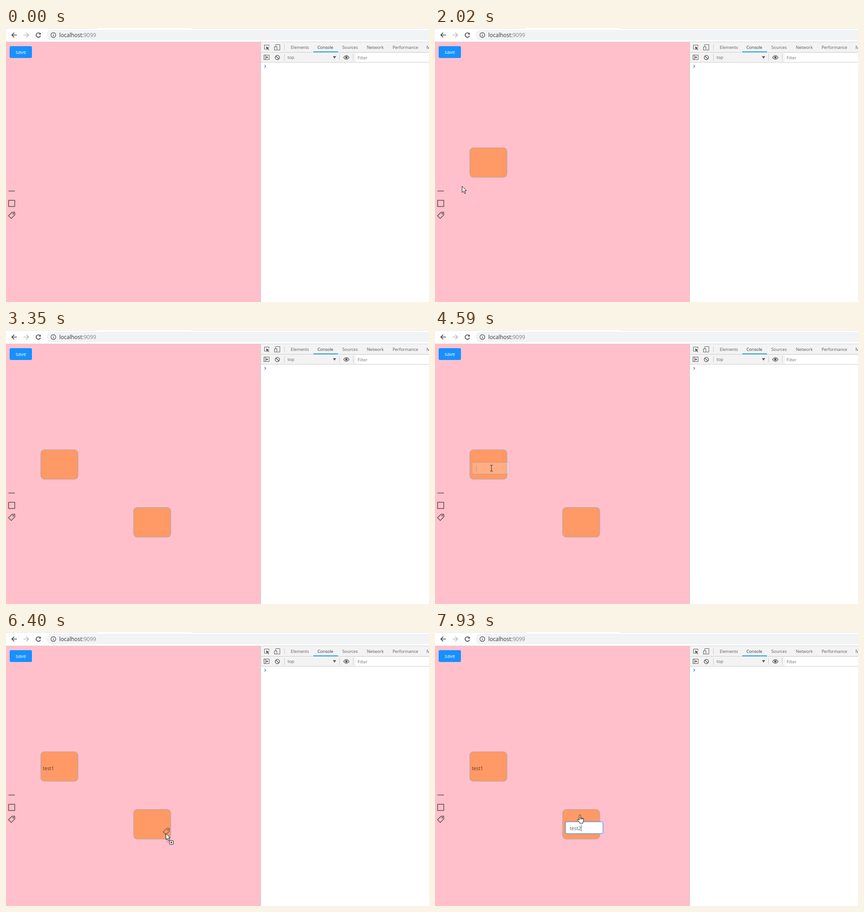
An HTML page that plays this animation: 929 by 603 pixels, repeating every 8000 ms.

```html
<!DOCTYPE html>
<html lang="en">
<head>
<meta charset="utf-8">
<title>Flow editor</title>
<style>
  html, body { margin: 0; width: 100%; height: 100%; overflow: hidden; background: #fff; }
  svg { display: block; width: 100%; height: 100%; font-family: "Open Sans", "Noto Sans", sans-serif; }
  .line { fill: none; stroke: #5a5a5a; }
  .tool { fill: none; stroke: #595050; stroke-width: 1.5; }
  .node { fill: #ff9966; stroke: #b5a6a0; stroke-width: 1.2; }
  .tabs { font-size: 9.3px; fill: #5a5a5a; }
  .label { font-size: 10.6px; fill: #000; fill-opacity: .65; }
  .field rect { fill: #fff; stroke: #40a9ff; }
  .field .glow { fill: none; stroke: #1890ff; stroke-opacity: .2; stroke-width: 2; }
  .field .caret { stroke: #555; stroke-width: 1; }
  .ghost { opacity: .75; }
  .cursor { fill: #fff; stroke: #111; stroke-width: 1; stroke-linejoin: round; }
</style>
</head>
<body>
<svg viewBox="0 0 929 603">
  <defs>
    <rect id="box" class="tool" x="5.7" y="379.2" width="13.6" height="13.6"/>
    <g id="tag" class="tool" stroke-linejoin="round">
      <path d="M13.2 405.6 19 405.2 19.6 411 11.6 419.2 5.4 413.2Z"/>
      <circle cx="16" cy="408.8" r="1.1" stroke-width="1.2"/>
    </g>
    <path id="pointer" d="M.5.5V14.2L3.6 11.3 5.9 16.6 8.2 15.6 6 10.4H10.2Z"/>
    <g id="arrow" class="cursor"><use href="#pointer"/></g>
    <g id="drag" class="cursor">
      <rect x="2.5" y="13.5" width="9" height="6" fill="none" stroke="#666" stroke-dasharray="1 1"/>
      <use href="#pointer"/>
      <rect x="8.5" y="16.5" width="8.5" height="8" rx=".8"/>
      <path d="M10.7 20.5H14.8M12.75 18.5V22.5" stroke-width="1.2"/>
    </g>
    <g id="hand" class="cursor">
      <path d="M-2 11.5V1.7a1.4 1.4 0 0 1 2.8 0V7L6 8.2q1.2.4 1.2 1.8V13q0 2-1.4 4V19H-1.2V17.4L-5.6 12.4q-1.2-1.8.3-2.2 1.3-.2 3.3 1.9"/>
      <path d="M.8 7V10.5M3 7.6V10.5M5.2 8.2V10.5" fill="none"/>
    </g>
    <path id="beam" d="M-3-6.5H-1Q0-6.5 0-5.5 0-6.5 1-6.5H3M0-5.5V5.5M-3 6.5H-1Q0 6.5 0 5.5 0 6.5 1 6.5H3" fill="none" stroke="#333" stroke-width="1.1"/>
  </defs>

  <!-- browser bar -->
  <rect width="929" height="31" fill="#fff"/>
  <path d="M0 .5H200M407 .5H929" stroke="#dee1e6"/>
  <rect x="89" y="4" width="900" height="23" rx="11.5" fill="#f1f3f4"/>
  <path d="M0 30.5H929" stroke="#d5d5d5"/>
  <g fill="none" stroke="#45484c" stroke-width="1.7">
    <path d="M24 15.5H13M18 10.3 12.8 15.5 18 20.7"/>
    <path d="M38.5 15.5H49.5M44.5 10.3 49.7 15.5 44.5 20.7" stroke="#b9bbbe"/>
    <path d="M74.6 12.2A4.9 4.9 0 1 0 75.8 17"/>
    <path d="M76.5 10V14.6H72Z" fill="#45484c" stroke="none"/>
    <circle cx="104" cy="15.5" r="5.3" stroke-width="1.2"/>
    <path d="M104 14.8V18.6M104 12.2V13.6" stroke-width="1.3"/>
  </g>
  <text x="117" y="19.7" font-size="12" fill="#2f3236">localhost:<tspan fill="#80868b">9099</tspan></text>

  <!-- page -->
  <rect y="31" width="559" height="572" fill="#ffc0cb"/>
  <rect x="8" y="40" width="49" height="26" rx="3" fill="#1890ff"/>
  <text x="32.7" y="56.8" font-size="11" fill="#fff" text-anchor="middle">save</text>
  <path class="tool" d="M5.5 358.7H19.5"/>
  <use href="#box"/>
  <use href="#tag"/>

  <!-- developer tools -->
  <rect x="559" y="31" width="370" height="45" fill="#f3f3f3"/>
  <rect x="559" y="76" width="370" height="527" fill="#fff"/>
  <rect x="768" y="55" width="161" height="20" fill="#fff"/>
  <path d="M559.5 31V603M559 53.5H929M559 75.5H929M611.5 36V49M611.5 57V72M732.5 57V72M762.5 57V72" stroke="#ccc" fill="none"/>
  <rect x="675" y="51.5" width="54" height="2" fill="#1a9fe8"/>
  <g class="line">
    <path d="M571.5 46.5H567.5V37.5H577.5V41"/>
    <path d="M571 40.5 578.5 44 575.3 45 578 48 577 49 574.2 46 572.8 48.8Z" fill="#5a5a5a" stroke="none"/>
    <path d="M592.5 41V36.5H601.5V48.5H596"/>
    <rect x="589.5" y="41.5" width="5.5" height="7"/>
    <rect x="566.5" y="59.5" width="11.5" height="10"/>
    <path d="M569.5 59.5V69.5"/>
    <path d="M571.5 61.8V67.4L576 64.6Z" fill="#5a5a5a" stroke="none"/>
    <g stroke-width="1.5"><circle cx="596" cy="65" r="4.7"/><path d="M592.7 61.7 599.3 68.3"/></g>
    <path d="M718 62H725L721.5 67.5Z" fill="#5a5a5a" stroke="none"/>
    <path d="M741.5 64.8Q747.5 56.5 753.5 64.8 747.5 73 741.5 64.8Z" stroke-width="1.3"/>
    <circle cx="747.5" cy="64.8" r="2.2" fill="#5a5a5a"/>
    <path d="M567.7 81.5 570.7 84.3 567.7 87.1" stroke="#2f8fee" stroke-width="1.4"/>
  </g>
  <g class="tabs">
    <text x="625.5" y="46.3">Elements</text>
    <text x="684" y="46.3" fill="#333">Console</text>
    <text x="738.5" y="46.3">Sources</text>
    <text x="792.5" y="46.3">Network</text>
    <text x="849" y="46.3">Performance</text>
    <text x="923.5" y="46.3">Memory</text>
    <text x="618.5" y="68.3">top</text>
    <text x="772" y="69.3" fill="#757575">Filter</text>
  </g>

  <!-- animated parts -->
  <rect id="node1" class="node" x="76.5" y="263.5" width="81.5" height="65" rx="8"/>
  <rect id="node2" class="node" x="280.3" y="390.7" width="81.5" height="65" rx="8"/>
  <text id="label1" class="label" x="81" y="303.7">test1</text>
  <g id="fields"></g>
  <use id="ghost" class="ghost"/>
  <use id="cursor"/>
</svg>

<script>
const LOOP = 8000;
const $ = id => document.getElementById(id);
const show = (el, on) => el.setAttribute('visibility', on ? 'visible' : 'hidden');

// Bursts of movement: start, end, number of screen updates
const bursts = [
  [150, 940, 11], [1000, 1090, 2], [1400, 2190, 11], [2250, 3040, 11],
  [3120, 3660, 8], [3890, 4270, 6], [4590, 4970, 6], [5220, 5990, 11],
  [6070, 6780, 10], [6940, 7640, 10], [7870, 7930, 2]
];

// Pointer path: time, x, y, kind ("box" and "tag" carry a dragged icon)
const path = [
  [150, 825, 577, 'arrow'], [310, 560, 240, 'arrow'], [470, 330, 73, 'arrow'],
  [700, 90, 250, 'arrow'], [930, 21, 369, 'hand'], [1090, 20, 384, 'hand'],
  [1399, 20, 382, 'box'], [1400, 50, 367, 'box'], [1630, 117, 296, 'box'],
  [1700, 117, 296, 'hand'], [1780, 112, 305, 'arrow'], [2100, 14, 384, 'hand'], [2190, 12, 386, 'hand'],
  [2249, 11, 387, 'box'], [2260, 22, 389, 'box'], [2720, 321, 419, 'box'], [2800, 321, 423, 'box'],
  [2880, 321, 423, 'hand'], [3040, 318, 420, 'hand'], [3120, 262, 395, 'arrow'],
  [3195, 110, 352, 'arrow'], [3270, -40, 360, 'arrow'], [3360, -30, 385, 'arrow'],
  [3425, 9, 404, 'hand'], [3660, 12, 413, 'hand'],
  [3889, 11, 415, 'tag'], [3890, 24, 404, 'tag'], [4265, 122, 304, 'tag'],
  [4590, 124, 304, 'beam'], [5530, 130, 304, 'beam'],
  [5610, 136, 318, 'hand'], [5680, 124, 330, 'arrow'], [5900, 20, 402, 'hand'], [6070, 12, 414, 'hand'],
  [6140, 11, 416, 'tag'], [6380, 351, 443, 'tag'], [6770, 327, 431, 'tag'],
  [6940, 329, 431, 'beam'], [7640, 337, 434, 'beam'],
  [7870, 322, 408, 'hand'], [7930, 319, 402, 'hand']
];

const fields = [
  { x: 81, y: 291, from: 4590, to: 6140, text: 'test1', keys: [5220, 5298, 5377, 5456, 5535] },
  { x: 286.5, y: 417.5, from: 6940, to: LOOP, text: 'test2', keys: [7328, 7406, 7484, 7562, 7870] }
];

for (const f of fields) {
  const g = document.createElementNS('http://www.w3.org/2000/svg', 'g');
  g.setAttribute('class', 'field');
  g.setAttribute('transform', `translate(${f.x} ${f.y})`);
  g.innerHTML = `<rect class="glow" x="-1" y="-1" width="84" height="28" rx="4"/>
    <rect x=".5" y=".5" width="81.5" height="25.5" rx="3"/>
    <text class="label" x="9.5" y="18"></text><path class="caret" d="M0 6V21"/>`;
  $('fields').append(g);
  Object.assign(f, { el: g, label: g.querySelector('text'), caret: g.querySelector('path') });
}

// Hold the picture between screen updates
function snap(t) {
  let held = 0;
  for (const [start, end, n] of bursts) {
    if (t < start) break;
    const step = (end - start) / (n - 1);
    held = Math.min(end, start + Math.floor((t - start) / step + 1e-6) * step);
  }
  return held;
}

function pointerAt(t) {
  let i = path.findLastIndex(k => k[0] <= t);
  if (i < 0) return null;
  const [t0, x0, y0, kind] = path[i];
  const [t1, x1, y1] = path[i + 1] || path[i];
  const p = t1 > t0 ? (t - t0) / (t1 - t0) : 0;
  while (i > 0 && path[i - 1][3] === kind) i--;
  return { kind, x: x0 + (x1 - x0) * p, y: y0 + (y1 - y0) * p, grab: path[i] };
}

function drawPointer(t) {
  const p = pointerAt(t);
  const dragging = p && (p.kind === 'box' || p.kind === 'tag');
  show($('cursor'), p);
  show($('ghost'), dragging);
  if (!p) return;
  $('cursor').setAttribute('href', '#' + (dragging ? 'drag' : p.kind));
  $('cursor').setAttribute('transform', `translate(${p.x} ${p.y})`);
  if (dragging) {
    $('ghost').setAttribute('href', '#' + p.kind);
    $('ghost').setAttribute('transform', `translate(${p.x - p.grab[1]} ${p.y - p.grab[2]})`);
  }
}

function drawField(f, t) {
  const on = t >= f.from && t < f.to;
  show(f.el, on);
  if (!on) return;
  f.el.setAttribute('opacity', Math.min(1, .2 + (t - f.from) / 375));
  f.label.textContent = f.text.slice(0, f.keys.filter(k => k <= t).length);
  const width = f.label.textContent ? f.label.getComputedTextLength() : 0;
  f.caret.setAttribute('transform', `translate(${10 + width} 0)`);
}

function render(now) {
  const t = snap(now % LOOP);
  show($('node1'), t >= 1700);
  show($('node2'), t >= 2880);
  show($('label1'), t >= fields[0].to);
  fields.forEach(f => drawField(f, t));
  drawPointer(t);
}

const begin = performance.now();
function tick() {
  render(performance.now() - begin);
  requestAnimationFrame(tick);
}
tick();
</script>
</body>
</html>
```
